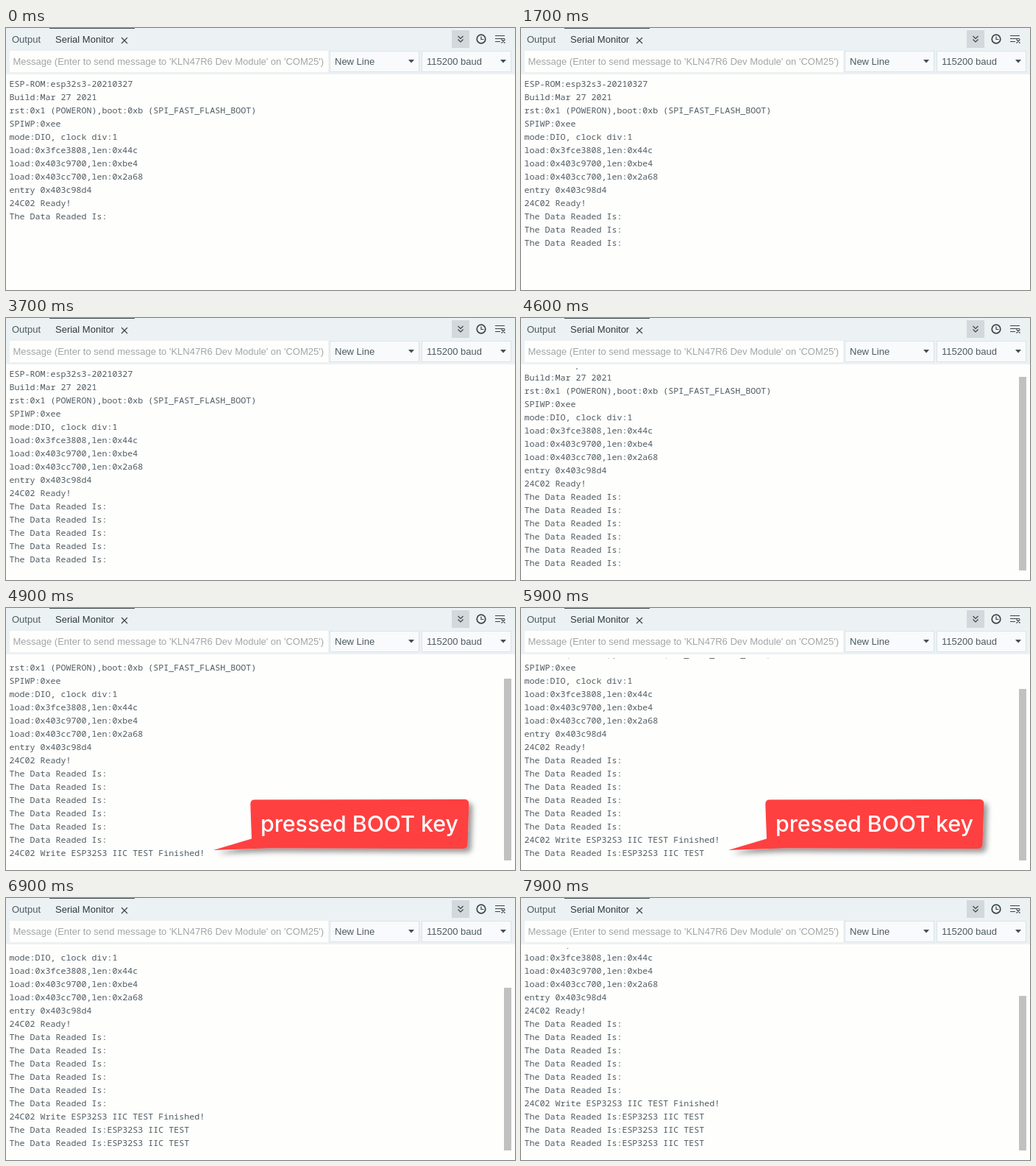
Write an HTML page that moves like this. It is 692 px wide and 356 px high and loops after 8000 ms.

```html
<!DOCTYPE html>
<html lang="en">
<head>
<meta charset="utf-8">
<title>Serial Monitor</title>
<style>
  html, body { margin: 0; width: 100%; height: 100%; overflow: hidden; background: #fefefd; }
  svg { display: block; width: 692px; height: 356px; }
  text { white-space: pre; }
  .ui { font: 13px "Liberation Sans", Arial, sans-serif; fill: #4e5b61; }
  .ui .active { fill: #2f393e; }
  .ui .hint { fill: #a2a5a6; }
  .select { fill: #f8fafb; stroke: #dce4e6; }
  .icon { fill: none; stroke: #3c4549; stroke-width: 1.2; }
  #log { font-family: "Noto Sans Mono", "Liberation Mono", monospace; fill: #4e5b61; }
  #label { font-family: Inter, "Open Sans", sans-serif; font-weight: 500; fill: #fff; }
</style>
</head>
<body>
<svg viewBox="0 0 692 356">
  <defs>
    <clipPath id="view"><rect x="0" y="68" width="676" height="275"/></clipPath>
    <filter id="shadow" x="-10%" y="-20%" width="125%" height="150%">
      <feDropShadow dx="5" dy="5" stdDeviation="3.5" flood-color="#000" flood-opacity=".4"/>
    </filter>
  </defs>

  <rect width="692" height="356" fill="#fefefd"/>
  <rect width="692" height="63" fill="#ecf1f4"/>
  <rect x="59" width="116" height="1" fill="#434f54"/>

  <rect x="5" y="31" width="433" height="29" fill="#fefefd"/>
  <rect class="select" x="440.5" y="31.5" width="121" height="28"/>
  <rect class="select" x="565.5" y="31.5" width="121" height="28"/>
  <path d="M547 43h8l-4 4.5zM672 43h8l-4 4.5z" fill="#434f54"/>

  <g class="ui">
    <text x="8" y="20">Output</text>
    <text x="67" y="20" class="active">Serial Monitor</text>
    <text x="9.5" y="50" class="hint">Message (Enter to send message to 'KLN47R6 Dev Module' on 'COM25')</text>
    <text x="447" y="50">New Line</text>
    <text x="572" y="50">115200 baud</text>
  </g>

  <rect x="606" y="3" width="24" height="24" fill="#d2d8db"/>
  <g class="icon">
    <path d="M157 13l8 8m0-8l-8 8"/>
    <path d="M614.5 11l3.5 3.5 3.5-3.5M614.5 15.5l3.5 3.5 3.5-3.5"/>
    <circle cx="646" cy="15" r="5.8" stroke-width="1.7"/>
    <path d="M646 11.5v4h3.5"/>
    <path d="M665 10.5h13M665 14.5h13M665 18.5h7M673.5 15.5l5 5m0-5l-5 5"/>
  </g>

  <g clip-path="url(#view)"><g id="log"></g></g>
  <rect id="thumb" x="677" width="10" fill="#c1c1c1"/>

  <g id="callout">
    <path filter="url(#shadow)" fill="#ff4141" d="M338 260.5L623 260Q629.5 260 629.3 266L627.5 321Q627.2 327 621 327L358 326.3L282 329L334 313.5L332.3 267Q332 260.5 338 260.5Z"/>
    <text id="label" x="346" y="304">pressed BOOT key</text>
  </g>
</svg>
<script>
const LOOP = 8000, ROW = 18, TOP = 68, VIEW = 275;
const CALLOUT = [4900, 6900];
const READ = 'The Data Readed Is:';
const VALUE = 'ESP32S3 IIC TEST';

// [time shown, text]
const lines = [
  'ESP-ROM:esp32s3-20210327',
  'Build:Mar 27 2021',
  'rst:0x1 (POWERON),boot:0xb (SPI_FAST_FLASH_BOOT)',
  'SPIWP:0xee',
  'mode:DIO, clock div:1',
  'load:0x3fce3808,len:0x44c',
  'load:0x403c9700,len:0xbe4',
  'load:0x403cc700,len:0x2a68',
  'entry 0x403c98d4',
  '24C02 Ready!',
  READ
].map(text => [0, text]);
for (const at of [700, 1700, 2700, 3700, 4600]) lines.push([at, READ]);
lines.push([4800, `24C02 Write ${VALUE} Finished!`]);
for (const at of [5900, 6900, 7900]) lines.push([at, READ + VALUE]);

const $ = id => document.getElementById(id);
const log = $('log'), thumb = $('thumb'), callout = $('callout'), label = $('label');

// Font size at which the text has the given natural width
function sizeFor(el, text, width) {
  const pen = document.createElement('canvas').getContext('2d');
  const style = getComputedStyle(el);
  pen.font = `${style.fontWeight} 100px ${style.fontFamily}`;
  return 100 * width / pen.measureText(text).width + 'px';
}
log.style.fontSize = sizeFor(log, 'M', 7);
label.style.fontSize = sizeFor(label, label.textContent, 269);

const rows = lines.map(([, text], i) => {
  const el = document.createElementNS('http://www.w3.org/2000/svg', 'text');
  el.setAttribute('x', 4.5);
  el.setAttribute('y', TOP + 12 + i * ROW);
  el.textContent = text;
  return log.appendChild(el);
});

const show = (el, on) => { el.style.display = on ? '' : 'none'; };

function draw(t) {
  const count = lines.filter(([at]) => t >= at).length;
  const full = count * ROW;
  const scroll = Math.max(0, full - VIEW);
  rows.forEach((el, i) => show(el, i < count));
  log.setAttribute('transform', `translate(0 ${-scroll})`);

  const size = Math.round(VIEW * VIEW / full);
  show(thumb, scroll > 0);
  thumb.setAttribute('y', TOP + VIEW - size);
  thumb.setAttribute('height', size);
  show(callout, t >= CALLOUT[0] && t < CALLOUT[1]);
}

const start = performance.now();
function tick(now) {
  draw(Math.max(0, now - start) % LOOP);
  requestAnimationFrame(tick);
}
draw(0);
requestAnimationFrame(tick);
</script>
</body>
</html>
```
